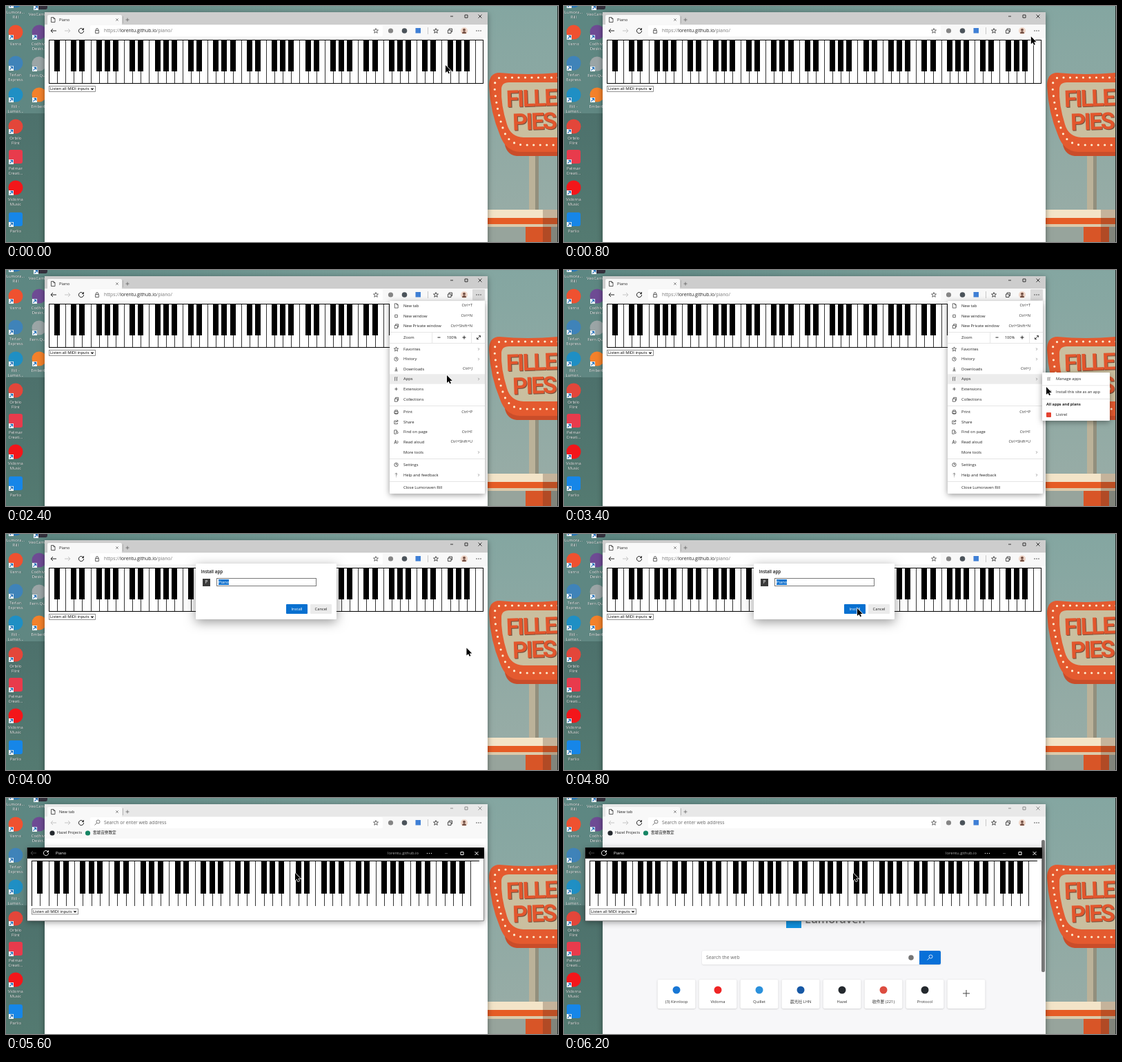
An HTML page with a canvas for the animation above (6.4 s loop, 800 by 343 pixels).

```html
<!DOCTYPE html>
<html lang="en">
<head>
<meta charset="utf-8">
<title>Piano</title>
<style>
html, body { margin: 0; width: 100%; height: 100%; overflow: hidden; background: #5b847f; }
canvas { display: block; }
</style>
</head>
<body>
<canvas id="stage" width="800" height="343"></canvas>
<script>
const ctx = document.getElementById('stage').getContext('2d');
const LOOP = 6400, STEP = 200;
const FONT = '"Open Sans", "Noto Sans CJK TC", "Noto Sans", sans-serif';
const ADDRESS = 'lorentu.github.io';

function box(x, y, w, h, color, radius = 0) {
  ctx.fillStyle = color;
  ctx.beginPath();
  ctx.roundRect(x, y, w, h, radius);
  ctx.fill();
}
function frame(x, y, w, h, color, width = 1) {
  ctx.strokeStyle = color;
  ctx.lineWidth = width;
  ctx.strokeRect(x, y, w, h);
}
function disc(x, y, r, color) {
  ctx.fillStyle = color;
  ctx.beginPath();
  ctx.arc(x, y, r, 0, 7);
  ctx.fill();
}
function text(s, x, y, color = '#222', size = 6, align = 'left', weight = 400, font = FONT) {
  ctx.font = `${weight} ${size}px ${font}`;
  ctx.textAlign = align;
  ctx.textBaseline = 'middle';
  ctx.fillStyle = color;
  ctx.fillText(s, x, y);
}
function shadowed(blur, draw, alpha = .4) {
  ctx.save();
  ctx.shadowColor = `rgba(0,0,0,${alpha})`;
  ctx.shadowBlur = blur;
  ctx.shadowOffsetY = blur / 4;
  draw();
  ctx.restore();
}

// Line icons, drawn around their own centre
const ICONS = {
  back: 'M4 0H-4M-1 -3L-4 0L-1 3',
  forward: 'M-4 0H4M1 -3L4 0L1 3',
  reload: 'M3.2 -1.6A3.6 3.6 0 1 0 3.6 0M3.4 -4V-1.4H1',
  close: 'M-2.5 -2.5L2.5 2.5M-2.5 2.5L2.5 -2.5',
  max: 'M-2 -2H2V2H-2Z',
  min: 'M-2 0H2',
  plus: 'M-2.5 0H2.5M0 -2.5V2.5',
  lock: 'M-2.5 -.5H2.5V3.5H-2.5ZM-1.5 -.5V-2A1.5 1.5 0 0 1 1.5 -2V-.5',
  page: 'M-2.5 -3.5H1L3 -1.5V3.5H-2.5ZM1 -3.5V-1.5H3',
  star: 'M0 -3.5L1 -1H3.5L1.5 .7L2.2 3.3L0 1.8L-2.2 3.3L-1.5 .7L-3.5 -1H-1Z',
  stack: 'M-2.5 -1H2V3.5H-2.5ZM-1 -1V-3H3.5V1.5H2',
  right: 'M-1 -2L1 0L-1 2',
  down: 'M-1.6 -.8L0 .9L1.6 -.8',
  expand: 'M-2.5 2.5L2.5 -2.5M0 -2.5H2.5V0M-2.5 0V2.5H0',
  clock: 'M3 0A3 3 0 1 1 -3 0A3 3 0 1 1 3 0M0 -2V0H1.6',
  download: 'M0 -3V2M-2 0L0 2L2 0M-2.5 3H2.5',
  apps: 'M-2 -3V3M1 -3V3M-2 -3H-1M1 -3H2',
  print: 'M-3 -1H3V2H-3ZM-2 -1V-3H2V-1M-2 1V3H2V1',
  share: 'M0 -2H-3V3H2V1M-1 1Q-1 -2 3 -2M1 -3.5L3 -2L1 0',
  find: 'M-3 -3H1V0M-3 -3V3H0M3 1A1.5 1.5 0 1 1 0 1A1.5 1.5 0 1 1 3 1',
  aloud: 'M-3 3L-1 -3L1 3M-2 1H0M2 -2Q4 0 2 2',
  help: 'M-1.5 -1.5Q-1 -3 .5 -3Q2 -2 0 0V1M0 2.2V3',
  lens: 'M4 -1.5A2.5 2.5 0 1 1 -1 -1.5A2.5 2.5 0 1 1 4 -1.5M-.3 .3L-3.5 3.5',
  jump: 'M-3 3L3 -3M-1.5 -3H3V1.5'
};
function icon(name, x, y, color = '#333', width = .8, scale = 1) {
  ctx.save();
  ctx.translate(x, y);
  ctx.scale(scale, scale);
  ctx.strokeStyle = color;
  ctx.lineWidth = width;
  ctx.stroke(new Path2D(ICONS[name]));
  ctx.restore();
}
function dots(x, y, color) {
  for (const dx of [-3, 0, 3]) disc(x + dx, y, .7, color);
}

// ---- desktop ----
const SHORTCUTS = [
  // x, y, colour, square?, label lines
  [14, -8, '#2a78b8', 0, 'Lumora...', 'Rill'],
  [50, -5, '#33303c', 1, 'VeoCam Q...'],
  [14, 38, '#ef5130', 0, 'Varno'],
  [48, 38, '#6e4b94', 0, 'Codhive', 'Deskt...'],
  [14, 83, '#3f83b9', 0, 'Terlan', 'Express'],
  [48, 84, '#9ba5a6', 0, 'Fern Qu...'],
  [14, 129, '#1f8fc4', 0, 'Rill -', 'Lumor...'],
  [48, 129, '#f4812a', 0, 'Emberly'],
  [14, 175, '#e3463a', 0, 'Orbilo', 'Flint'],
  [14, 219, '#e83b4c', 1, 'Pelmar', 'Creati...'],
  [14, 264, '#f3161a', 0, 'Vidorna', 'Music'],
  [14, 310, '#1686e8', 1, 'Parlio']
];
function shortcut([x, y, color, square, ...lines]) {
  if (square) box(x - 10, y - 10, 20, 20, color, 3);
  else disc(x, y, 10.5, color);
  box(x - 10, y + 4, 7, 7, '#f4f8fa');
  icon('jump', x - 6.5, y + 7.5, '#1767b5', 1.6, .7);
  lines.forEach((s, i) => {
    text(s, x + .5, y + 17.5 + i * 7, 'rgba(0,0,0,.6)', 6, 'center');
    text(s, x, y + 17 + i * 7, '#fff', 6, 'center');
  });
}
function sign() {
  box(758, 215, 14, 82, '#bbb299');
  box(767, 215, 5, 82, '#928f7d');
  ctx.fillStyle = '#c94d2a';
  ctx.fill(new Path2D('M722 194Q723 216 740 218H800V190Z'));
  ctx.fillStyle = '#e45a2f';
  ctx.fill(new Path2D('M700 116Q700 97 715 97Q755 101 800 97V212H745Q724 211 716 188Q702 155 700 116Z'));
  ctx.fillStyle = '#cabf9f';
  ctx.fill(new Path2D('M718 121Q718 111 729 111H800V191H750Q731 190 726 172Q717 143 718 121Z'));
  ctx.save();
  ctx.strokeStyle = '#fff0d2';
  ctx.lineWidth = 3.2;
  ctx.lineCap = 'round';
  ctx.setLineDash([0, 9.5]);
  ctx.stroke(new Path2D('M800 104H720Q708 103 708 118Q711 152 721 180Q728 201 750 202H800'));
  ctx.restore();
  ctx.save();
  ctx.translate(725, 137);
  ctx.rotate(-.035);
  ctx.letterSpacing = '-2.5px';
  [['FILLED', 0, 0], ['PIES', 8, 34]].forEach(([s, x, y]) => {
    text(s, x + 1, y + 1, '#77523f', 34, 'left', 700, 'Roboto, sans-serif');
    text(s, x, y, '#e2562d', 34, 'left', 700, 'Roboto, sans-serif');
  });
  ctx.restore();
}
function desktop() {
  const g = ctx.createLinearGradient(0, 0, 0, 343);
  g.addColorStop(0, '#5d8782');
  g.addColorStop(.455, '#608782');
  g.addColorStop(.456, '#4d716c');
  g.addColorStop(1, '#547a71');
  ctx.fillStyle = g;
  ctx.fillRect(0, 0, 400, 343);
  const top = ctx.createLinearGradient(56, 0, 700, 0);
  top.addColorStop(0, '#5d8782');
  top.addColorStop(1, '#84a6a1');
  box(56, 0, 644, 10, top);
  const right = ctx.createLinearGradient(0, 0, 0, 300);
  right.addColorStop(0, '#84a6a1');
  right.addColorStop(1, '#97aca6');
  box(690, 0, 110, 343, right);
  sign();
  box(690, 296, 110, 12, '#f3e4c8');
  box(690, 308, 110, 9, '#e65c25');
  box(690, 317, 110, 4, '#dccaab');
  box(690, 321, 110, 22, '#97a49c');
  box(753, 321, 37, 22, '#d85527');
  box(778, 296, 21, 47, 'rgba(70,45,35,.27)');
  box(799, 0, 1, 343, '#29302f');
  SHORTCUTS.forEach(shortcut);
}

// ---- piano ----
function piano(x, y, w, h, blackH, outlined = true) {
  const key = w / 52, left = Math.round(x);
  box(left, y, w, h, '#fff');
  ctx.fillStyle = '#000';
  for (let i = 1; i < 52; i++) ctx.fillRect(Math.round(x + i * key), y, .8, h);
  for (let i = 0; i < 51; i++)
    if (![1, 4].includes(i % 7))
      ctx.fillRect(Math.round(x + (i + 1) * key - 4), y, 8, blackH);
  if (outlined) frame(left + .5, y + .5, w - 1, h - 1, '#000');
  else {
    ctx.fillRect(left, y, w, 1);
    ctx.fillRect(left, y, 1, h);
  }
}
function picker(x, y, outlined = true) {
  box(x, y, 68, 9, '#fff', 1);
  if (outlined) frame(x + .5, y + .5, 67, 8, '#777', .8);
  text('Listen all MIDI inputs', x + 2, y + 4.5, '#000', 5.8);
  icon('down', x + 63, y + 4.5, '#000', 1.2);
}

// ---- browser ----
function browser(s) {
  shadowed(8, () => box(56, 9, 642, 345, '#fff'));
  box(56, 9, 642, 18, s.app ? '#e8e8e8' : '#cdcdcd');
  box(60, 13, 108, 15, '#f8f8f8', [2, 2, 0, 0]);
  box(56, 27, 642, s.app ? 32 : 20, '#f8f8f8');
  box(122, 28, 424, 16, '#fff', 2);
  if (s.loading) box(65, 19, 2, 2, '#3d89d9', 1);
  else icon('page', 68, 20, '#333');
  text(s.app ? 'New tab' : 'Piano', 77, 20, '#222', 5.8);
  icon('close', 161, 20, '#333', .8, .7);
  ctx.fillStyle = '#aaa';
  ctx.fillRect(169, 15, .8, 10);
  icon('plus', 176, 20, '#555', .7);
  const chrome = s.app ? '#777' : '#111';
  icon('min', 646, 15, chrome);
  icon('max', 667, 15, chrome);
  icon('close', 687, 15, chrome);

  icon('back', 69, 36, s.app ? '#c4c4c4' : '#222', 1);
  icon('forward', 89, 36, '#c4c4c4', 1);
  icon(s.loading ? 'close' : 'reload', 109, 36, '#222', 1);
  if (s.app) {
    icon('lens', 132, 36, '#555');
    text('Search or enter web address', 142, 36, '#666', 6.8);
  } else {
    icon('lock', 132, 36, '#444');
    text('https://', 142, 36, '#777', 6.8);
    const a = 142 + ctx.measureText('https://').width;
    text(ADDRESS, a, 36, '#222', 6.8);
    text('/piano/', a + ctx.measureText(ADDRESS).width, 36, '#777', 6.8);
  }
  icon('star', 536, 36, '#444');
  disc(557.5, 36, 3.6, '#858585');
  disc(577.5, 36, 3.8, '#4b535a');
  box(593.5, 32, 7.5, 7.5, '#3f7fd5');
  box(611, 31, .8, 10, '#bbb');
  icon('star', 623, 36, '#222');
  icon('stack', 643, 36, '#222');
  disc(664, 36, 5, '#efd6c8');
  disc(664, 34.7, 2, '#765246');
  box(661, 37, 6, 3, '#765246', [3, 3, 0, 0]);
  if (s.menu) box(676, 28, 18, 16, '#dadada', 1);
  dots(685, 36, '#222');

  if (!s.app) {
    piano(62, 49, 630, 64, 46);
    picker(62, 116);
    return;
  }
  disc(67, 51, 3.6, '#24292e');
  text('Hazel Projects', 74, 51, '#222', 5.5);
  disc(118.5, 51, 3.6, '#168564');
  text('雲端音樂教室', 126, 51, '#222', 5.6);
  if (s.loaded) newTab();
}
const TILES = [
  ['(3) Kinnloop', '#1877d5'], ['Vidorna', '#ef2525'], ['Quillet', '#2b91dc'],
  ['晨光社 LHN', '#1658a5'], ['Hazel', '#24292e'], ['收件匣 (221)', '#dc4c40'],
  ['Protocol', '#24292e'], ['', '']
];
function newTab() {
  box(56, 59, 642, 284, '#f7f7f9');
  box(692, 61, 5, 192, '#777', 2);
  box(322, 167, 22, 22, '#1291df');
  text('Lumoraven', 349, 178, '#747474', 16, 'left', 600);
  shadowed(2, () => box(200, 222, 346, 20, '#fff', 2), .15);
  text('Search the web', 206, 232, '#666', 6.8);
  disc(503, 232, 3.8, '#757575');
  box(515, 222, 31, 20, '#0870d8', [0, 2, 2, 0]);
  icon('lens', 530, 232, '#fff');
  TILES.forEach(([label, color], i) => {
    const x = 135.5 + i * 60;
    shadowed(2, () => box(x, 264, 55, 42, '#fff', 2), .22);
    if (label) disc(x + 27.5, 279, 5.5, color);
    else icon('plus', x + 27.5, 284, '#444', .5, 2);
    text(label, x + 27.5, 296, '#333', 5.8, 'center');
  });
}

// ---- menus and dialog ----
const MENU = [
  [52, 'New tab', 'Ctrl+T', 'page'], [67, 'New window', 'Ctrl+N', 'max'],
  [81.5, 'New Private window', 'Ctrl+Shift+N', 'stack'],
  [115, 'Favorites', '>', 'star'], [129.5, 'History', '>', 'clock'],
  [144, 'Downloads', 'Ctrl+J', 'download'], [158.5, 'Apps', '>', 'apps'],
  [173, 'Extensions', '', 'plus'], [188, 'Collections', '', 'stack'],
  [206.5, 'Print', 'Ctrl+P', 'print'], [221, 'Share', '', 'share'],
  [235.5, 'Find on page', 'Ctrl+F', 'find'], [250, 'Read aloud', 'Ctrl+Shift+U', 'aloud'],
  [265, 'More tools', '>'], [283, 'Settings', '', 'clock'],
  [298, 'Help and feedback', '>', 'help'], [316.5, 'Close Lumoraven Rill', '']
];
function menu(s) {
  shadowed(8, () => box(556, 45, 138, 280, '#fff', 1));
  MENU.forEach(([y, label, hint, glyph]) => {
    const hot = s.submenu ? label === 'Apps' : s.x > 556 && s.x < 694 && Math.abs(s.y - y) < 7.2;
    if (hot) box(556, y - 7.2, 138, 14.5, '#ececec');
    if (glyph) icon(glyph, 565.5, y, '#333', .8, .9);
    text(label, 576, y, '#222', 5.8);
    if (hint === '>') icon('right', 685, y, '#555', .7, .8);
    else text(hint, 676, y, '#333', 5.6, 'right');
  });
  for (const y of [90, 106, 197, 274, 307]) box(556, y, 138, .7, '#ddd');
  text('Zoom', 576, 98.5, '#222', 5.8);
  for (const x of [617, 674]) box(x, 91, .7, 15, '#ddd');
  icon('min', 627.5, 98, '#222', 1);
  text('100%', 646, 98.5, '#222', 5.6, 'center');
  icon('plus', 664, 98, '#222', 1);
  icon('expand', 685, 98, '#222');
}
function submenu() {
  shadowed(8, () => box(693, 149, 98, 70, '#fff', 1));
  icon('apps', 703, 158.5, '#333', .8, .8);
  text('Manage apps', 713, 158.5, '#222', 5.8);
  box(693, 167.5, 98, .7, '#ddd');
  icon('stack', 703, 177.5, '#333', .8, .8);
  text('Install this site as an app', 713, 177.5, '#222', 5.6);
  box(693, 187, 98, .7, '#ddd');
  text('All apps and plans', 699, 196, '#222', 5.5, 'left', 700);
  box(699, 207, 7, 7, '#e44332', 1);
  text('Listrel', 713, 210.5, '#222', 5.8);
}
function dialog() {
  shadowed(16, () => box(275, 43, 204, 81, '#fff', 1));
  text('Install app', 282.5, 55, '#111', 6.3, 'left', 600);
  box(285, 65, 11, 11, '#3b3b3b');
  text('P', 290.5, 70.5, '#fff', 6.5, 'center');
  frame(305.5, 64.5, 144, 11, '#777');
  box(308, 66, 15, 8, '#1473ce');
  text('Piano', 308, 70, '#fff', 5.8);
  box(406, 102, 31, 14, '#0870d0', 1);
  text('Install', 421.5, 109, '#fff', 5.8, 'center');
  box(441, 102, 31, 14, '#ebebeb', 1);
  text('Cancel', 456.5, 109, '#222', 5.8, 'center');
}
function appWindow(opening) {
  ctx.save();
  if (opening) {
    ctx.globalAlpha = .87;
    ctx.translate(362, 125);
    ctx.scale(.991, .991);
    ctx.translate(-362, -125);
  }
  // A shadow would show through the fading window
  shadowed(opening ? 0 : 9, () => box(31, 72, 662, 107, '#fff'));
  frame(30.5, 72.5, 662, 106, '#555', .7);
  box(31, 72, 662, 16, '#000');
  icon('back', 40, 80, '#444', 1);
  icon('reload', 58, 80, '#eee', 1);
  text('Piano', 72, 80.5, '#fff', 5.8);
  if (!opening) text(ADDRESS, 598, 80.5, '#aaa', 5.8, 'right');
  dots(613.5, 80.5, '#ddd');
  if (!opening) icon('min', 638, 80.5, '#555');
  icon('max', 661, 80.5, '#fff', 1);
  icon('close', 682, 80.5, '#fff', 1);
  piano(36.6, 91, 649, 66, 48, opening);
  picker(37, 160.5, !opening);
  ctx.restore();
}

// ---- pointer ----
const PATH = [
  // time, x, y
  [0, 637, 86], [200, 638, 84], [1000, 684, 37], [1200, 683, 40], [1400, 673, 62],
  [2400, 639, 153], [2800, 643, 156], [3400, 699, 170], [3600, 710, 175],
  [3800, 712, 176], [4600, 427, 109], [4800, 425, 108], [5000, 425, 108],
  [5400, 419, 109], [6400, 419, 109]
];
function pointerAt(t) {
  const i = PATH.findIndex(p => p[0] > t);
  const [t0, x0, y0] = PATH[i - 1], [t1, x1, y1] = PATH[i];
  const k = (t - t0) / (t1 - t0), e = k * k * (3 - 2 * k);
  return { x: x0 + (x1 - x0) * e, y: y0 + (y1 - y0) * e };
}
const ARROW = new Path2D('M0 0V11L2.6 8.7L4.3 12.3L6 11.5L4.3 8H7.8Z');
function pointer({ x, y }) {
  ctx.save();
  ctx.translate(x, y);
  ctx.strokeStyle = '#fff';
  ctx.lineWidth = 1.4;
  ctx.stroke(ARROW);
  ctx.fillStyle = '#000';
  ctx.fill(ARROW);
  ctx.restore();
}

function render(t) {
  const s = {
    ...pointerAt(t),
    menu: t >= 1200 && t < 3800,
    submenu: t >= 2800 && t < 3800,
    dialog: t >= 4000 && t < 5200,
    app: t >= 5400,
    loading: t >= 5400 && t < 5600,
    loaded: t >= 5800
  };
  desktop();
  browser(s);
  if (s.menu) menu(s);
  if (s.submenu) submenu();
  if (s.dialog) dialog();
  if (s.app) appWindow(s.loading);
  pointer(s);
}

let shown = -1;
function tick() {
  const t = Math.floor(performance.now() % LOOP / STEP) * STEP;
  if (t !== shown) render(shown = t);
  requestAnimationFrame(tick);
}
tick();
</script>
</body>
</html>
```
